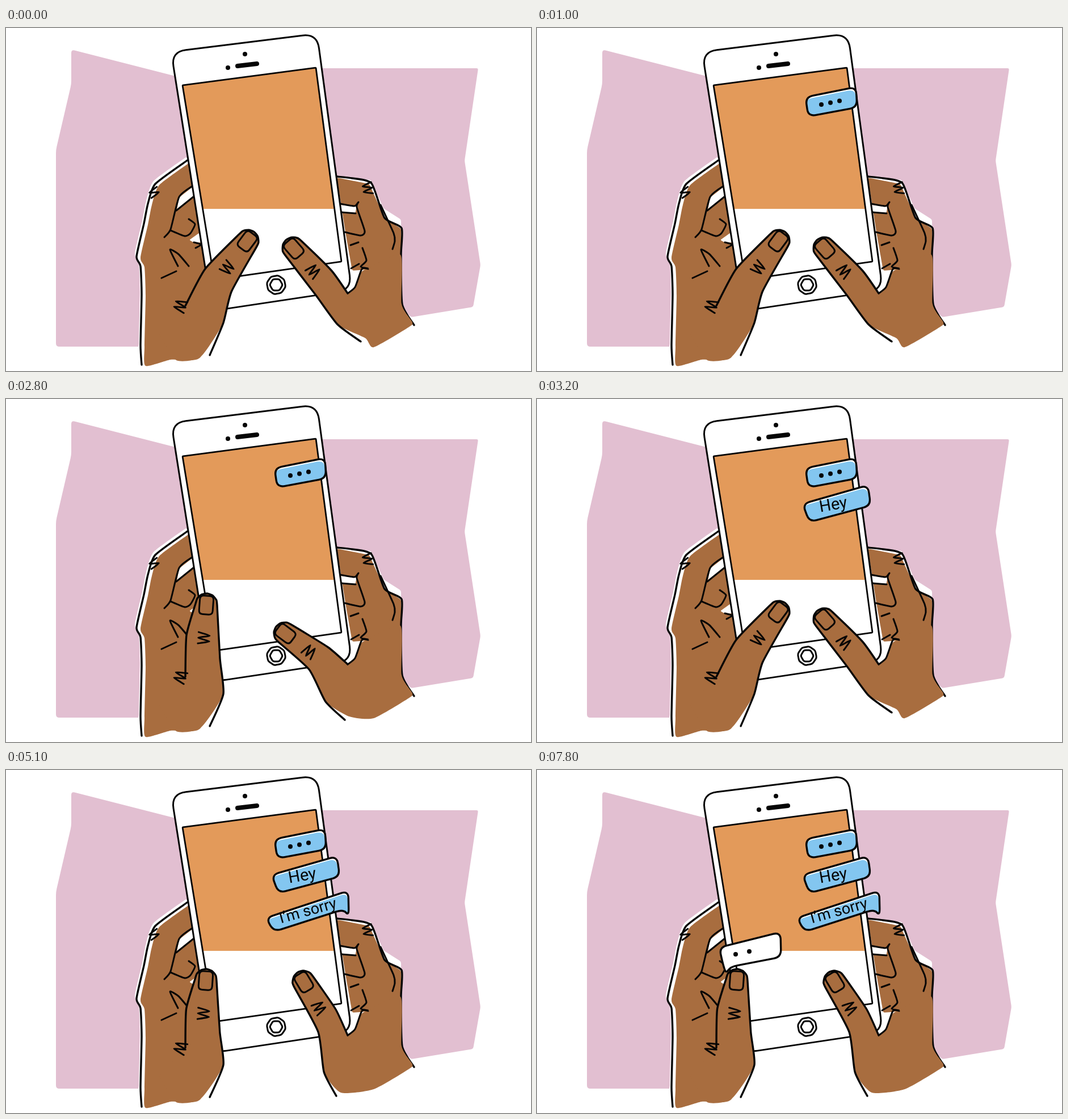
An HTML page with a canvas for the animation above (8 s loop, 925 by 605 pixels).

```html
<!DOCTYPE html>
<html lang="en">
<head>
<meta charset="utf-8">
<title>Texting</title>
<style>
html, body { margin: 0; width: 100%; height: 100%; overflow: hidden; background: #fff; }
canvas { display: block; width: 925px; height: 605px; }
</style>
</head>
<body>
<canvas id="stage" width="925" height="605"></canvas>
<script>
const ctx = document.getElementById('stage').getContext('2d');
const LOOP = 8000;
const INK = '#050505', SKIN = '#a86d3f', PINK = '#e2bfd1', ORANGE = '#e39a5a', BLUE = '#83c6f0';

const parse = s => s.split(' ').map(p => p.split(',').map(Number));
const toPoints = p => typeof p === 'string' ? parse(p) : p;
const lerp = (a, b, t) => [a[0] + (b[0] - a[0]) * t, a[1] + (b[1] - a[1]) * t];
const shift = (p, x, y) => [p[0] + x, p[1] + y];

// Local frame: d runs along the angle, s to its right.
const frame = ([x, y], a) => (d, s) =>
  [x + d * Math.cos(a) - s * Math.sin(a), y + d * Math.sin(a) + s * Math.cos(a)];

// Open curve with low tension, so corners stay angular.
function curve(pts, k = 0.1) {
  const path = new Path2D();
  const at = i => pts[Math.max(0, Math.min(pts.length - 1, i))];
  path.moveTo(...pts[0]);
  for (let i = 0; i < pts.length - 1; i++) {
    const [a, b, c, d] = [at(i - 1), at(i), at(i + 1), at(i + 2)];
    path.bezierCurveTo(b[0] + (c[0] - a[0]) * k, b[1] + (c[1] - a[1]) * k,
      c[0] - (d[0] - b[0]) * k, c[1] - (d[1] - b[1]) * k, ...c);
  }
  return path;
}

// Closed polygon with every corner rounded by up to r.
function rounded(pts, r) {
  pts = toPoints(pts);
  const path = new Path2D(), n = pts.length;
  const toward = (a, b) => lerp(a, b, Math.min(0.5, r / Math.hypot(b[0] - a[0], b[1] - a[1])));
  pts.forEach((p, i) => {
    path.lineTo(...toward(p, pts[(i + n - 1) % n]));
    path.quadraticCurveTo(...p, ...toward(p, pts[(i + 1) % n]));
  });
  path.closePath();
  return path;
}

function fill(path, color) {
  ctx.fillStyle = color;
  ctx.fill(path);
}

function stroke(path, width = 3) {
  ctx.strokeStyle = INK;
  ctx.lineWidth = width;
  ctx.stroke(path);
}

const sketch = (...lines) => lines.forEach(l => stroke(curve(toPoints(l))));

function zigzag(center, angle, half, step, turns = 5) {
  const at = frame(center, angle);
  sketch(Array.from({ length: turns }, (_, i) =>
    at((i - (turns - 1) / 2) * step, i % 2 ? half : -half)));
}

function ring(center, sides, r, turn) {
  const at = frame(center, turn);
  const pts = Array.from({ length: sides }, (_, i) => {
    const a = i / sides * Math.PI * 2;
    return at(r * Math.cos(a), r * Math.sin(a));
  });
  stroke(rounded(pts, 3));
}

function dots(count, x, y, dx, dy) {
  ctx.fillStyle = INK;
  for (let i = 0; i < count; i++) {
    ctx.beginPath();
    ctx.arc(x + i * dx, y + i * dy, 4, 0, Math.PI * 2);
    ctx.fill();
  }
}

function label(text, x, y, size, angle) {
  ctx.save();
  ctx.translate(x, y);
  ctx.rotate(angle);
  ctx.font = size + 'px Roboto, sans-serif';
  ctx.fillStyle = INK;
  ctx.textAlign = 'center';
  ctx.textBaseline = 'middle';
  ctx.fillText(text, 0, 0);
  ctx.restore();
}

// The colour is printed slightly off the outline, which leaves a white rim.
function bubble(corners, color) {
  const path = rounded(corners, 13);
  fill(path, '#fff');
  ctx.save();
  ctx.clip(path);
  ctx.translate(-1, 4);
  fill(path, color);
  ctx.restore();
  stroke(path, 3.4);
}

function backdrop() {
  ctx.fillStyle = '#fff';
  ctx.fillRect(0, 0, 925, 605);
  fill(rounded('115,38 330,93 340,562 88,562 88,215 115,99', 6), PINK);
  fill(rounded('540,71 832,71 808,234 836,418 823,492 714,510 600,400', 3), PINK);
}

const LEFT_EDGE = parse('320,233 263,275 250,310 243,345 230,403 237,420 239,470 237,560 239,594');
const RIGHT_EDGE = parse('583,262 610,265 644,274 667,335 697,353 696,400 698,487 719,524');

function leftFingers() {
  fill(curve([...LEFT_EDGE.map(p => shift(p, -3, -5)), [350, 594], [350, 250]]), '#fff');
  fill(curve([...LEFT_EDGE.map(p => shift(p, 7, 2)), [290, 585], [343, 580], [365, 470], [345, 330]]), SKIN);
  fill(rounded('305,299 328,281 332,295 301,321', 2), '#fff');
  fill(rounded('323,374 341,361 344,378 332,379', 2), '#fff');
  stroke(curve(LEFT_EDGE), 3.4);
  zigzag([261, 290], 1.2, 8, 5, 4);
  sketch('328,279 305,298 290,355 279,369', '300,322 331,297', '290,357 315,367 325,362 333,346 322,337',
    '331,378 344,382 334,388', '322,420 304,399 289,391 303,420', '274,441 300,429');
}

function rightFingers() {
  fill(rounded('583,262 643,268 665,318 696,338 697,487 606,455', 3), '#fff');
  fill(rounded('583,264 640,275 667,335 696,354 697,425 637,426 610,428 598,360', 3), SKIN);
  fill(rounded('589,312 618,314 615,328 592,324', 2), '#fff');
  stroke(curve(RIGHT_EDGE), 3.4);
  zigzag([637, 283], 1.4, 8, 5);
  sketch('660,312 683,362 685,376 681,390', '589,310 614,314 621,307 618,316 632,358 625,366 597,360',
    '591,325 616,327', '607,383 621,378', '628,388 635,410 625,421 638,424', '608,424 622,416');
}

function phone() {
  const [tl, tr, br, bl] = parse('291,42 548,10 609,462 363,499');
  const body = rounded([tl, tr, br, bl], 26);
  fill(body, '#fff');
  stroke(body);
  const screen = rounded('311,101 546,70 591,412 367,444', 1);
  ctx.save();
  ctx.clip(screen);
  ctx.fillStyle = ORANGE;
  ctx.fillRect(300, 60, 300, 259);
  ctx.restore();
  stroke(screen, 2.8);
  dots(2, 391, 70, 30, -24);
  stroke(curve([[408, 67], [442, 63]]), 8);
  ring([476, 453], 8, 17, 0.2);
  ring([476, 453], 6, 11.5, 0);
}

// side is -1 when the web lies left of the thumb, 1 when right.
function thumb({ side, tip, fold, web, heel, wrist, end, palm, reach }) {
  const base = lerp(web, heel, 0.5), r = 19;
  const angle = Math.atan2(tip[1] - base[1], tip[0] - base[0]);
  const at = frame(tip, angle);
  const pad = Array.from({ length: 7 }, (_, i) => {
    const a = i / 6 * Math.PI;
    return at(r * Math.sin(a), side * r * Math.cos(a));
  });
  const edge = [fold, web, ...pad, heel, wrist];
  fill(curve([...edge, ...palm]), SKIN);
  stroke(curve([...edge, end]), 3.4);
  stroke(rounded([at(-18, -12), at(15, -12), at(15, 12), at(-18, 12)], 7));
  zigzag(at(-reach, 0), angle, 10, 5);
}

function leftThumb([x, y]) {
  thumb({
    side: -1, tip: [x, y], fold: [316, 490], reach: 60,
    web: [318 + 0.45 * (x - 353), 427 + 0.65 * (y - 378)],
    heel: [377 + 0.28 * (x - 353), 277 + 0.5 * y],
    wrist: [383, 520], end: [359, 577],
    palm: parse('343,580 300,586 270,540')
  });
  zigzag([307, 490], 1.9, 10, 5);
}

function rightThumb([tip, heel, end]) {
  const fold = [602, 468];
  thumb({
    side: 1, tip, fold, heel, end, reach: 54,
    web: shift(lerp(tip, fold, 0.6), 10, -8),
    wrist: shift(lerp(heel, end, 0.6), -9, 3),
    palm: [shift(end, 8, -6), ...parse('648,563 709,528 716,519 697,487 695,400 637,424 625,432 615,457')]
  });
  sketch([fold, [615, 457], [627, 425], [638, 425]]);
}

// left: thumb tip; right: thumb tip, heel and wrist
const POSES = {
  up: { left: [426, 375], right: parse('506,388 545,470 625,553') },
  low: { left: [426, 430], right: parse('546,377 532,470 598,591') },
  mid: { left: [416, 404], right: parse('492,415 522,482 600,573') },
  tall: { left: [353, 362], right: parse('491,413 534,477 597,566') },
  reach: { left: [423, 427], right: parse('528,370 550,455 597,548') },
  rest: { left: [352, 370], right: parse('524,373 550,462 582,575') }
};

// Bursts of typing: start, step, poses; the last pose holds while a message lands.
const BURSTS = [
  [0, 500, 'up rest'],
  [700, 100, 'low up low up'],
  [2000, 200, 'mid tall low mid tall low up'],
  [4700, 100, 'reach up rest reach rest']
];

function poseAt(t) {
  const [start, step, names] = BURSTS.filter(b => b[0] <= t).pop();
  const list = names.split(' ');
  return POSES[list[Math.min(list.length - 1, Math.floor((t - start) / step))]];
}

function messages(t) {
  if (t >= 1000) {
    bubble('473,122 562,104 564,140 478,156', BLUE);
    dots(3, 501, 135, 16, -3.3);
  }
  if (t >= 3200) {
    bubble('468,185 583,152 588,188 480,217', BLUE);
    label('Hey', 522, 187, 29, -0.17);
  }
  if (t >= 5100) {
    bubble('458,261 603,213 604,257 594,246 472,285', BLUE);
    label('I\u2019m sorry', 532, 249, 27, -0.27);
  }
  if (t >= 7300) {
    bubble('321,313 429,286 430,330 341,347 333,359 328,344', '#fff');
    if (t >= 7800) dots(2, 350, 325, 24, -5);
  }
}

function draw(t) {
  const pose = poseAt(t);
  ctx.lineCap = ctx.lineJoin = 'round';
  backdrop();
  leftFingers();
  rightFingers();
  phone();
  messages(t);
  leftThumb(pose.left);
  rightThumb(pose.right);
}

const start = performance.now();
function tick() {
  draw((performance.now() - start) % LOOP);
  requestAnimationFrame(tick);
}
tick();
</script>
</body>
</html>
```
